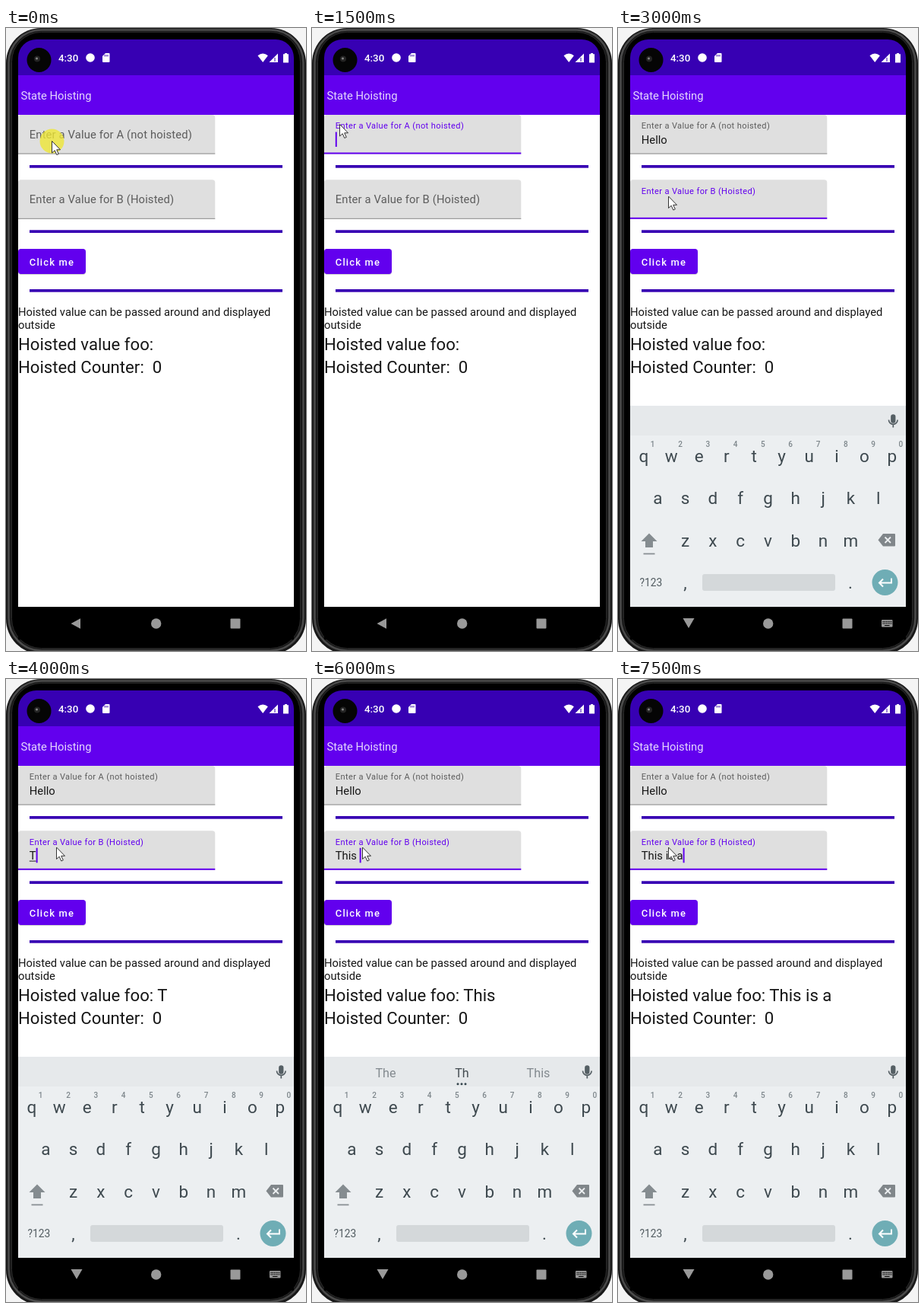
Animation, 395 px wide and 818 px high, one loop 8000 ms. Source, as an HTML page:

```html
<!DOCTYPE html>
<html lang="en">
<head>
<meta charset="utf-8">
<title>State Hoisting</title>
<style>
  html, body { margin: 0; width: 100%; height: 100%; overflow: hidden; background: #f4f4f4; }
  svg { display: block; width: 395px; height: 818px; }
  text { font-family: Roboto, sans-serif; font-size: 14.79px; fill: #161616; white-space: pre; }
  .title { fill: #e6d8fd; }
  .clock { font-size: 13.3px; font-weight: 500; fill: #fff; }
  .label { fill: #5c5c5c; letter-spacing: .139px; }
  .label.up { font-size: 11.09px; letter-spacing: .37px; }
  .label.on { fill: #6200ee; }
  .button { font-size: 12.94px; font-weight: 500; letter-spacing: 1.155px; fill: #fff; }
  .big { font-size: 22.18px; }
  .mid { text-anchor: middle; }
  .key { font-size: 22.5px; fill: #3e494f; }
  .hint { font-size: 10px; font-weight: 500; fill: #7d868b; }
  .word { font-size: 16.2px; fill: #838a8f; }
  .word.main { fill: #454d52; }
  .word.bold { font-weight: 500; fill: #263238; }
</style>
</head>
<body>
<svg viewBox="0 0 395 818">
  <!-- phone body -->
  <rect width="395" height="818" fill="#f4f4f4"/>
  <rect x="0" y="0" width="395" height="822" rx="46" fill="#191919"/>
  <rect x="3.5" y="2.5" width="388" height="815" rx="43" fill="none" stroke="#4b4b4b" stroke-width="2.5"/>
  <rect x="7.5" y="5.5" width="380" height="809" rx="39" fill="#000" stroke="#2b2b2b"/>

  <!-- screen -->
  <rect x="16" y="100" width="363" height="660" fill="#fff"/>
  <path d="M16 62V39a24 24 0 0 1 24-24H355a24 24 0 0 1 24 24V62Z" fill="#3700b3"/>
  <rect x="16" y="62" width="363" height="52" fill="#6200ee"/>
  <text class="title" x="19.5" y="94">State Hoisting</text>

  <!-- status bar -->
  <circle cx="43.5" cy="42" r="16" fill="#050505"/>
  <circle cx="41" cy="40.5" r="4" fill="#242424"/>
  <circle cx="40.5" cy="40" r="1.5" fill="#858585"/>
  <text class="clock" x="69" y="44">4:30</text>
  <g fill="#fff">
    <circle cx="111" cy="39" r="5.8"/>
    <path d="M131 33h4.5q1 0 1 1v10q0 1-1 1h-7.500q-1 0-1-1V37Z"/>
    <path d="M331.500 36.200q6.700-5.200 13.400 0L338.200 45Z"/>
    <path d="M358 33.500V45H346.500Z"/>
    <path d="M367 33h3v1.300h2V45.500h-7V34.300h2Z"/>
  </g>
  <path d="M130 35v2.500M132 35v2.500M134 35v2.500" stroke="#3700b3" stroke-width=".9"/>
  <path d="M354 39v5" stroke="#3700b3" stroke-width="1"/>

  <!-- content -->
  <g id="fields"></g>
  <g fill="#3700b3">
    <rect x="31" y="180" width="333" height="3.7"/>
    <rect x="31" y="265.300" width="333" height="3.7"/>
    <rect x="31" y="343" width="333" height="3.7"/>
  </g>
  <rect x="16" y="291" width="89" height="33" rx="3.700" fill="#000" opacity=".18"/>
  <rect x="16" y="290" width="89" height="33" rx="3.700" fill="#6200ee"/>
  <text class="button" x="30.800" y="311.700">Click me</text>
  <text x="16" y="377.700">Hoisted value can be passed around and displayed</text>
  <text x="16" y="395.300">outside</text>
  <text class="big" id="foo" x="16" y="423"></text>
  <text class="big" x="16" y="452.500">Hoisted Counter:  0</text>

  <!-- keyboard -->
  <g id="keyboard">
    <rect x="16" y="496" width="363" height="264" fill="#eceff1"/>
    <rect x="16" y="496" width="363" height="39" fill="#e6e9eb"/>
    <g id="words"></g>
    <g id="dots" fill="#37474f">
      <circle cx="192" cy="531.700" r="1.500"/><circle cx="197" cy="531.700" r="1.500"/><circle cx="202" cy="531.700" r="1.500"/>
    </g>
    <g fill="none" stroke="#555f64" stroke-width="1.700">
      <rect x="360" y="508" width="4.600" height="10" rx="2.300" fill="#555f64"/>
      <path d="M356.500 514.500a5.800 5.800 0 0 0 11.600 0M362.300 520.500v4"/>
    </g>
    <g id="keys"></g>
    <path d="M41 663.500 51.500 674H46v8H36v-8H30.500Z" fill="#858c90"/>
    <rect id="shift" x="33.500" y="689.500" width="15" height="1.800"/>
    <path d="M349 664h15q1 0 1 1v14.500q0 1-1 1h-15L342.500 672.200Z" fill="#80868a"/>
    <path d="M351.500 668.500l7.500 7.500M359 668.500l-7.500 7.500" stroke="#eceff1" stroke-width="1.800"/>
    <text class="mid" x="43.500" y="732.500" style="font-size:13.800px;fill:#525c61">?123</text>
    <rect x="111" y="717" width="175" height="22" rx="3" fill="#d4d8da"/>
    <circle cx="351.500" cy="728" r="17" fill="#6fadb5"/>
    <path d="M360 722.500v6h-15.500M349 723.500l-5 5 5 5" fill="none" stroke="#fff" stroke-width="2"/>
  </g>

  <!-- navigation -->
  <rect x="16" y="760" width="363" height="43" fill="#000"/>
  <g fill="#999">
    <path id="back" d="M98 775.200V788.800L85.500 782Z"/>
    <path id="hide" d="M85.500 775H100.500L93 788Z"/>
    <circle cx="197.700" cy="782" r="6.700"/>
    <rect x="295.500" y="775.500" width="13" height="13" rx="1"/>
    <g id="switch">
      <rect x="347" y="777" width="14.500" height="9.500" rx="1"/>
      <path d="M348.500 779.500h12M348.500 781.800h12" stroke="#000" stroke-width="1.300" stroke-dasharray="1.200 1"/>
      <path d="M351 784.500h6.500" stroke="#000" stroke-width="1"/>
    </g>
  </g>

  <!-- pointer -->
  <g id="pointer">
    <circle id="press" cx="0" cy="0" r="16" fill="#efe733" opacity=".78"/>
    <path d="M0 0V15.500L3.700 12.200 6.300 18 8.800 16.900 6.200 11.300H11Z" fill="#fff" stroke="#333" stroke-width="1"/>
  </g>
</svg>
<script>
const NS = 'http://www.w3.org/2000/svg';
const $ = id => document.getElementById(id);
const show = (el, on) => el.setAttribute('display', on ? 'inline' : 'none');

function add(parent, tag, attrs, text = '') {
  const el = document.createElementNS(NS, tag);
  for (const k in attrs) el.setAttribute(k, attrs[k]);
  el.textContent = text;
  parent.append(el);
  return el;
}

function makeField(top, label) {
  const g = $('fields');
  add(g, 'path', { d: `M16 ${top + 51.5}V${top + 3.7}q0-3.7 3.7-3.7H271.600q3.7 0 3.7 3.7V${top + 51.5}Z`, fill: '#dfdfdf' });
  const line = add(g, 'rect', { x: 16, width: 259.3 });
  const name = add(g, 'text', { x: 30.8 }, label);
  const value = add(g, 'text', { x: 30.8, y: top + 37.7 });
  const under = add(g, 'rect', { x: 30.8, y: top + 39.3, height: 1, fill: '#222' });
  const caret = add(g, 'rect', { y: top + 22.5, width: 2, height: 19.5, fill: '#6200ee' });
  return ({ text, focus, blink, draft }) => {
    const up = focus || text !== '';
    const thick = focus ? 2 : 1;
    line.setAttribute('y', top + 51.5 - thick);
    line.setAttribute('height', thick);
    line.setAttribute('fill', focus ? '#6200ee' : '#8b8b8b');
    name.setAttribute('class', 'label' + (up ? ' up' : '') + (focus ? ' on' : ''));
    name.setAttribute('y', top + (up ? 18.2 : 30.5));
    value.textContent = text;
    const w = text ? value.getComputedTextLength() : 0;
    under.setAttribute('width', w);
    show(under, draft);
    caret.setAttribute('x', 30.8 + w);
    show(caret, focus && blink);
  };
}

const fieldA = makeField(114, 'Enter a Value for A (not hoisted)');
const fieldB = makeField(199.3, 'Enter a Value for B (Hoisted)');

function keyRow(letters, x, y) {
  [...letters].forEach((c, i) => add($('keys'), 'text', { class: 'key mid', x: x + i * 36.3, y }, c));
}
keyRow('qwertyuiop', 34, 569.5);
keyRow('asdfghjkl', 52.3, 625);
keyRow('zxcvbnm', 88.5, 680.5);
keyRow(',', 88.5, 735.5);
keyRow('.', 306, 735.5);
[...'1234567890'].forEach((c, i) =>
  add($('keys'), 'text', { class: 'hint mid', x: 45.7 + i * 36.3, y: 550 }, c));

const words = [97, 197.5, 298].map(x => add($('words'), 'text', { x, y: 522.7 }));

const THE = ['The', 'Th', 'This'];
const steps = [
  { at: 0, x: 60.5, y: 148.5, press: true },
  { at: 500, x: 50, y: 139, focus: 'A', blink: true },
  { at: 1500, x: 36.5, y: 126.5 },
  { at: 2000, x: 60, y: 224, a: 'Hello', draft: true, keys: true, words: ['Help', 'Hello', 'Cello'], shift: '#76a9ae' },
  { at: 2500, x: 66.5, y: 221, focus: 'B', draft: false, words: [], shift: '#8a9094' },
  { at: 3000, blink: false },
  { at: 3500, blink: true },
  { at: 4000, b: 'T', draft: true },
  { at: 4500, b: 'Th', words: THE },
  { at: 5000, b: 'Thi' },
  { at: 6000, b: 'This ', draft: false },
  { at: 6500, b: 'This i' },
  { at: 7000, b: 'This is' },
  { at: 7500, b: 'This is a', words: [] }
];

// Each step keeps whatever it does not change.
let last = { a: '', b: '', focus: '', blink: false, draft: false, keys: false, words: [], shift: '#8a9094' };
const states = steps.map(s => last = { ...last, press: false, ...s });

function draw(s) {
  for (const [id, field, text] of [['A', fieldA, s.a], ['B', fieldB, s.b]]) {
    const focus = s.focus === id;
    field({ text, focus, blink: s.blink, draft: focus && s.draft });
  }
  $('foo').textContent = 'Hoisted value foo: ' + s.b;
  for (const id of ['keyboard', 'hide', 'switch']) show($(id), s.keys);
  show($('back'), !s.keys);
  show($('dots'), s.words.length);
  words.forEach((el, i) => {
    const style = i !== 1 ? '' : s.words[1] === s.a ? ' bold' : ' main';
    el.setAttribute('class', 'word mid' + style);
    el.textContent = s.words[i] || '';
  });
  $('shift').setAttribute('fill', s.shift);
  $('pointer').setAttribute('transform', `translate(${s.x} ${s.y})`);
  show($('press'), s.press);
}

const LOOP = 8000;
const start = performance.now();
let current = null;
function tick() {
  const t = (performance.now() - start) % LOOP;
  const state = states.filter(s => s.at <= t).pop();
  if (state !== current) draw(current = state);
  requestAnimationFrame(tick);
}
tick();
</script>
</body>
</html>
```
